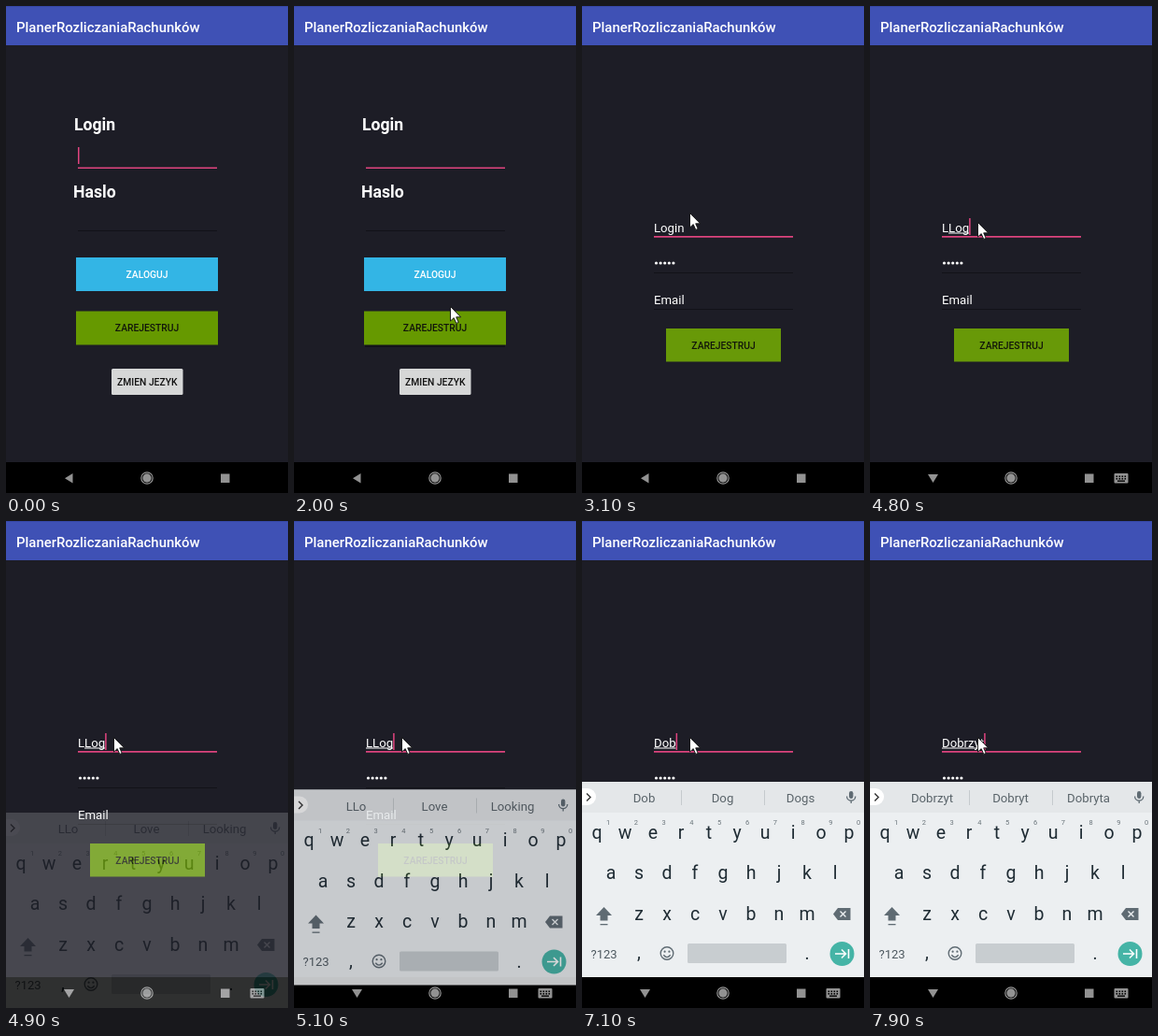
Recreate the animation shown at these times as an HTML page. Size 302 by 521 pixels, loop 8000 ms.

```html
<!DOCTYPE html>
<html lang="pl">
<head>
<meta charset="utf-8">
<style>
html, body { margin: 0; width: 100%; height: 100%; overflow: hidden; background: #000; }
svg { display: block; font-family: Roboto, sans-serif; }
text { white-space: pre; }
</style>
</head>
<body>
<svg id="stage" width="302" height="521" viewBox="0 0 302 521"></svg>
<script>
const LOOP = 8000, STEP = 100;
const PINK = '#e0447f', GREEN = '#669900', ICON = '#5f6b73';
const stage = document.getElementById('stage');

const rect = (x, y, w, h, fill, extra = '') =>
  `<rect x="${x}" y="${y}" width="${w}" height="${h}" fill="${fill}" ${extra}/>`;
const circle = (x, y, r, fill, extra = '') =>
  `<circle cx="${x}" cy="${y}" r="${r}" fill="${fill}" ${extra}/>`;
const label = (x, y, size, fill, str, extra = '') =>
  `<text x="${x}" y="${y}" font-size="${size}" fill="${fill}" ${extra}>${str}</text>`;
const centered = (x, y, size, fill, str, extra = '') =>
  label(x, y, size, fill, str, `text-anchor="middle" ${extra}`);
const line = (d, color, width = 1.4) =>
  `<path d="${d}" fill="none" stroke="${color}" stroke-width="${width}"/>`;
const button = (x, y, w, h, fill, color, str, extra = '') =>
  rect(x, y, w, h, fill, extra) +
  centered(x + w / 2, y + h / 2 + 3.8, 10.3, color, str, 'font-weight="500"');

const windowBase = rect(0, 0, 302, 488, '#1d1d26') + rect(0, 0, 302, 42, '#3f51b5') +
  rect(0, 0, 302, 1, '#3748a6') +
  label(11, 28, 14.9, '#fff', 'PlanerRozliczaniaRachunków', 'font-weight="500"');

const loginScreen = windowBase +
  label(73, 133, 17.64, '#fff', 'Login', 'font-weight="700"') +
  label(72, 205, 17.64, '#fff', 'Haslo', 'font-weight="700"') +
  rect(77, 172.5, 149, 1.5, PINK) + rect(77, 240, 149, 1, '#121218') +
  rect(77, 151, 1.5, 18, PINK, 'id="loginCaret"') +
  button(75, 269, 152, 36, '#33b5e5', '#fff', 'ZALOGUJ') +
  rect(76, 362, 150, 3, '#13131a', 'id="shadow"') +
  button(75, 326.5, 152, 36, GREEN, '#12160a', 'ZAREJESTRUJ') +
  rect(79, 327, 145, 35, '#fff', 'id="ripple"') +
  button(113, 388, 76.5, 28, '#d6d7d7', '#111', 'ZMIEN JEZYK', 'rx="1.5"');

const registerScreen = windowBase +
  label(77, 241.5, 13.2, '#fff', '', 'id="field"') +
  rect(77, 242.5, 0, 1, '#fff', 'id="composing"') +
  rect(77, 227, 1.5, 18, PINK, 'id="caret"') +
  rect(77, 246, 149, 1.7, PINK) +
  [0, 1, 2, 3, 4].map(i => circle(79.5 + i * 4.6, 275, 1.6, '#fff')).join('') +
  rect(77, 285, 149, 1, '#121218') +
  label(77, 319, 13.2, '#fff', 'Email') + rect(77, 324, 149, 1, '#121218') +
  button(90, 345, 123, 35.5, '#689908', '#12160a', 'ZAREJESTRUJ');

const keyRow = (letters, x, y) => [...letters].map((c, i) =>
  centered(x + i * 30, y, 19.5, '#1f2c34', c)).join('');

const keyboard = rect(0, 279, 302, 209, '#eceff1') + rect(0, 279, 302, 33, '#e4e7e9') +
  `<path d="M0 286H6A9 9 0 0 1 6 304H0Z" fill="#fff"/>` +
  line('M5 291.5L9 295.5 5 299.5', '#333') +
  rect(106, 288, 1, 16, '#c5cacd') + rect(195, 288, 1, 16, '#c5cacd') +
  [66.5, 150.5, 234].map(x => centered(x, 301, 13.2, '#5a646a', '', 'class="hint"')).join('') +
  rect(286, 289, 4.4, 8, ICON, 'rx="2.2"') +
  line('M283.6 294.5A4.6 4.6 0 0 0 292.8 294.5M288.2 299V302', ICON, 1.3) +
  keyRow('qwertyuiop', 16, 339.5) + keyRow('asdfghjkl', 31, 383) + keyRow('zxcvbnm', 61, 426.5) +
  [...'1234567890'].map((c, i) => centered(28 + i * 29.8, 325, 7.5, '#6b757b', c)).join('') +
  `<path d="M23.5 413L32 422H27.5V427.5H19.5V422H15Z" fill="${ICON}"/>` + rect(19.5, 431, 8, 1.3, ICON) +
  `<path d="M269 420.5L274 414H287.5V427H274Z" fill="${ICON}"/>` +
  line('M276.5 417.5L282.5 423.5M282.5 417.5L276.5 423.5', '#eceff1') +
  label(9.5, 467.5, 13, '#4d585f', '?123') + keyRow(',', 61, 468) + keyRow('.', 241, 469) +
  circle(91, 462.5, 6.8, 'none', `stroke="${ICON}" stroke-width="1.4"`) +
  circle(88.6, 460.7, 1.1, ICON) + circle(93.4, 460.7, 1.1, ICON) +
  line('M87.3 464.3Q91 469 94.7 464.3', ICON) +
  rect(113, 452, 106, 21, '#c8cdd0', 'rx="1.5"') +
  circle(278.5, 463, 13, '#45b4a6') +
  line('M271 463H282M278 458.5L282.5 463 278 467.5M285.5 458V468', '#fff', 1.6);

const dots = [263.5, 266.5, 269.5, 272.5].map(x =>
  rect(x, 502.5, 1.6, 1.6, '#000') + rect(x, 505, 1.6, 1.6, '#000')).join('');
const navBar = rect(0, 488, 302, 33, '#000') +
  '<path id="back" fill="#929292"/>' +
  circle(151, 505, 6.2, 'none', 'stroke="#929292" stroke-width="1.2"') + circle(151, 505, 4.7, '#929292') +
  rect(230, 500.5, 9.5, 9.5, '#929292') +
  `<g id="imeIcon">${rect(261.5, 500, 15, 10.5, '#929292', 'rx="1"')}${dots}${rect(265, 507.5, 8, 1.4, '#000')}</g>`;

stage.innerHTML = loginScreen + `<g id="register">${registerScreen}</g>` + navBar +
  `<g id="keyboard">${keyboard}</g>` +
  `<path id="pointer" d="M.5.5V16L4.2 12.6 6.8 18.4 9.2 17.4 6.7 11.8H11.6Z" fill="#fff" stroke="#111" stroke-width=".9"/>`;

const $ = id => document.getElementById(id);
const hintNodes = [...document.querySelectorAll('.hint')];

// Pointer path: time, x, y
const path = [[100, 169, 352], [500, 169, 352], [900, 168, 340], [1300, 168, 340], [1700, 167, 321],
  [2500, 167, 321], [3100, 115, 221], [3200, 115, 221], [3500, 115, 231], [LOOP, 115, 231]];

// Field contents: time, plain part, underlined part, caret shown
const typing = [[0, 'Login', '', 0], [3500, 'Login', '', 1], [3800, '', 'Login', 1], [4300, '', 'Logi', 1],
  [4500, '', 'Log', 1], [4700, 'L', 'Log', 1], [5100, '', 'LLog', 1], [5500, '', 'LLo', 1],
  [5700, '', 'L', 1], [5800, '', '', 0], [6000, '', '', 1],
  ...[6800, 6900, 7100, 7300, 7400, 7600, 7900].map((time, i) => [time, '', 'Dobrzyt'.slice(0, i + 1), 1])];

const hints = [[0, 'LLo', 'Love', 'Looking'], [5500, 'thanks', 'I', 'we'], [6500, 'D', 'Do', 'Days'],
  [6800, 'Do', 'Don’t', 'Does'], [7100, 'Dob', 'Dog', 'Dogs'],
  ...[7300, 7400, 7600, 7700].map((time, i) => [time, 'Dobrzyt'.slice(0, i + 4), 'Dobryt', 'Dobryta'])];

const clamp = v => Math.max(0, Math.min(1, v));
const current = (list, t) => list.filter(entry => entry[0] <= t).pop();
const show = (id, on) => $(id).setAttribute('visibility', on ? 'inherit' : 'hidden');
const place = (id, x, y, opacity = 1) => {
  $(id).setAttribute('transform', `translate(${x} ${y})`);
  $(id).setAttribute('opacity', opacity);
};

function movePointer(t) {
  show('pointer', t >= 100);
  const i = Math.max(1, path.findIndex(p => p[0] > t));
  const [a, b] = [path[i - 1], path[i]];
  const k = clamp((t - a[0]) / (b[0] - a[0]));
  place('pointer', a[1] + (b[1] - a[1]) * k, a[2] + (b[2] - a[2]) * k);
}

function updateField(t) {
  const [, plain, underlined, caretOn] = current(typing, t);
  const field = $('field');
  const measure = str => (field.textContent = str) ? field.getComputedTextLength() : 0;
  const start = measure(plain), end = measure(plain + underlined);
  $('composing').setAttribute('x', 77 + start);
  $('composing').setAttribute('width', underlined ? end - start : 0);
  $('caret').setAttribute('x', 77 + end);
  show('caret', caretOn);
}

function render(t) {
  show('loginCaret', t < 400 || t >= 900 && t < 2000);
  show('shadow', t >= 1100);
  $('ripple').setAttribute('opacity', t >= 1400 && t < 1700 ? 0.1 * (1700 - t) / 300 : 0);

  const opening = clamp((t - 2400) / 300);
  show('register', t >= 2400);
  place('register', 0, 16 * (1 - opening) ** 2, Math.min(1, 0.35 + 1.35 * opening));
  updateField(t);

  const imeOpen = t >= 3800;
  $('back').setAttribute('d', imeOpen ? 'M62 501H73L67.5 510Z' : 'M71.5 500V510.5L63 505.2Z');
  show('imeIcon', imeOpen);

  show('keyboard', t >= 4900);
  if (t < 5100) place('keyboard', 0, 33, 0.2);
  else if (t < 5300) place('keyboard', 0, 8.5, 0.825);
  else place('keyboard', 0, 0);
  const words = current(hints, t);
  hintNodes.forEach((node, i) => node.textContent = words[i + 1]);

  movePointer(t);
}

const began = performance.now();
function tick() {
  render(Math.floor((performance.now() - began) % LOOP / STEP) * STEP);
  requestAnimationFrame(tick);
}
tick();
</script>
</body>
</html>
```
